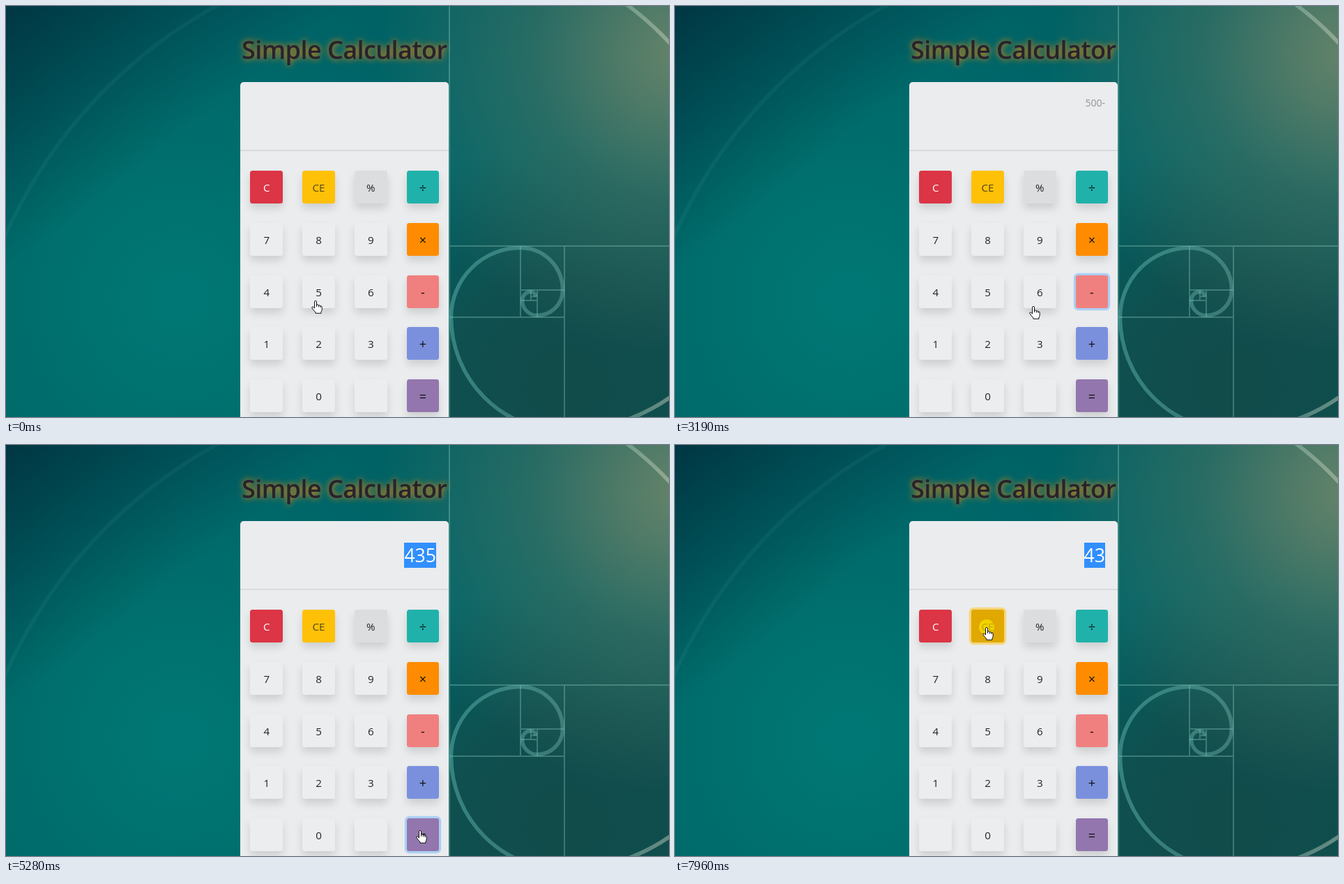
An HTML page for the animation above (8000 ms loop, 951x589 px).

```html
<!DOCTYPE html>
<html lang="en">
<head>
<meta charset="utf-8">
<title>Simple Calculator</title>
<style>
html, body { margin: 0; width: 100%; height: 100%; overflow: hidden; }
body {
  position: relative;
  font-family: "Open Sans", "Noto Sans", sans-serif;
  background:
    linear-gradient(142deg, #003743 0, #00374300 300px),
    radial-gradient(circle at 965px 70px, #64836a 0, #64836acc 80px, #64836a66 210px, #64836a00 430px),
    radial-gradient(ellipse 380px 340px at 800px 540px, #124b4a 0, #124b4ad0 45%, #124b4a00 100%),
    radial-gradient(circle at 250px 420px, #007875 0, #006e6c 220px, #006568 400px, #00585c 750px);
}
svg { position: absolute; left: 0; top: 0; width: 951px; height: 589px; fill: none; }
h1 {
  position: absolute; left: 338px; top: 38px; margin: 0;
  font-size: 36px; font-weight: 600; line-height: 49px; letter-spacing: -.55px;
  white-space: nowrap; color: #29222d; text-shadow: 0 0 10px #ff8c00;
}
#panel {
  position: absolute; left: 336px; top: 109px; width: 299px; height: 520px;
  border-radius: 5px; background: #eaecee;
}
#rule { position: absolute; left: 0; top: 97px; width: 100%; height: 2px; background: #d9dbde; }
#small, #main { position: absolute; right: 18px; line-height: normal; white-space: pre; }
#small { top: 20px; font-size: 14px; color: #909396; }
#main { top: 31px; font-size: 26.6px; color: #fff; background: #318ffe; }
.key {
  position: absolute; width: 46.7px; height: 47px; border-radius: 3.5px;
  font-size: 15.2px; line-height: 49px; text-align: center; color: #212529;
  background: #ebedef; box-shadow: 0 7px 12px #00000020;
}
.key.op { font-size: 18px; color: #111; }
.key.focus { box-shadow: 0 0 0 3.2px #abd0f4; }
.key.warn { color: #54481c; }
.key.warn.hover { background: #e0a800 !important; }
.key.warn.focus { box-shadow: 0 0 0 3.2px #f5d67b; }
</style>
</head>
<body>
<svg viewBox="0 0 951 589">
  <defs>
    <linearGradient id="fade" gradientUnits="userSpaceOnUse" x1="0" y1="0" x2="951" y2="0">
      <stop offset="0" stop-color="#62c4be" stop-opacity=".08"/>
      <stop offset=".33" stop-color="#62c4be" stop-opacity=".07"/>
      <stop offset=".67" stop-color="#70ccc5" stop-opacity=".4"/>
      <stop offset=".85" stop-color="#84c8c0" stop-opacity=".36"/>
      <stop offset="1" stop-color="#d2d8c4" stop-opacity=".45"/>
    </linearGradient>
  </defs>
  <path id="lines" stroke="#8cc8bd" stroke-opacity=".36" stroke-width="2"/>
  <path id="spiral" stroke="url(#fade)" stroke-width="5.5"/>
</svg>
<h1>Simple Calculator</h1>
<div id="panel">
  <div id="small"></div>
  <div id="main"></div>
  <div id="rule"></div>
</div>
<svg viewBox="0 0 951 589">
  <g id="pointer">
    <circle id="press" r="11" fill="#ffee00" fill-opacity=".6"/>
    <g stroke="#111" stroke-width="1" stroke-linejoin="round">
      <g id="hand">
        <path fill="#fff" d="M-1.5 1.8Q-1.5 .5 0 .5T1.5 1.8V6Q4 5.4 4.3 7Q6.6 6.2 7 8Q9.2 7.6 9.2 9.5V13Q9 15 8 16V18.3H0V17Q-3 14-5.2 10.5Q-5.5 8.6-3.6 9.2L-1.5 11Z"/>
        <path d="M1.5 6V9M4.3 7V9.5M7 8V10"/>
      </g>
      <path id="arrow" fill="#fff" d="M.5 .7V13.6L3.4 10.9L5.4 15.6L7.4 14.7L5.4 10.1H9.3Z"/>
    </g>
  </g>
</svg>
<script>
const LOOP = 8000, HOLD = 60;
const $ = id => document.getElementById(id);

// Golden spiral: each quarter turn shrinks by phi, its centre slides towards the arc's end.
function drawSpiral() {
  const PHI = (1 + Math.sqrt(5)) / 2, INSET = 2.5;
  const dirs = [[0, -1], [1, 0], [0, 1], [-1, 0]];
  let x = 636, y = 611, r = 699, arcs = '', lines = '';
  for (let turn = 3; r > 8; turn++) {
    const [ax, ay] = dirs[turn % 4], [bx, by] = dirs[(turn + 1) % 4];
    const q = r - INSET;
    arcs += `M${x + ax * q} ${y + ay * q}A${q} ${q} 0 0 1 ${x + bx * q} ${y + by * q}`;
    lines += `M${x} ${y}L${x + bx * r} ${y + by * r}`;
    const next = r / PHI;
    x += bx * (r - next);
    y += by * (r - next);
    r = next;
  }
  $('spiral').setAttribute('d', arcs);
  $('lines').setAttribute('d', lines);
}
drawSpiral();

const LABELS = ['C', 'CE', '%', '÷', '7', '8', '9', '×', '4', '5', '6', '-', '1', '2', '3', '+', '', '0', '', '='];
const COLORS = {
  C: '#dc3545', CE: '#ffc107', '%': '#dcddde', '÷': '#20b2aa',
  '×': '#ff8c00', '-': '#f08080', '+': '#7b90dd', '=': '#9376ae'
};
const keys = LABELS.map((label, i) => {
  const el = document.createElement('div');
  const x = 350.4 + i % 4 * 74.75, y = 236.3 + Math.floor(i / 4) * 74.7;
  el.className = 'key' + (label === 'CE' ? ' warn' : i % 4 === 3 ? ' op' : '');
  el.textContent = label;
  el.style.left = x + 'px';
  el.style.top = y + 'px';
  if (COLORS[label]) el.style.background = COLORS[label];
  if (label === 'C') el.style.color = '#fff';
  return { label, el, x, y };
});
$('panel').after(...keys.map(k => k.el));

const PRESSES = [
  { at: 80, key: '5' }, { at: 780, key: '0' }, { at: 935, key: '0' },
  { at: 2180, key: '-' }, { at: 3340, key: '6' }, { at: 4180, key: '5' },
  { at: 5190, key: '=' }, { at: 7260, key: 'CE' }, { at: 7955, key: 'CE' }
];

function calculate({ main, small }, key) {
  if (key === 'CE') return { main: main.slice(0, -1), small };
  if (key === '-') return { main: '', small: main + '-' };
  if (key === '=') return { main: String(parseFloat(small) - main), small: '' };
  return { main: main + key, small };
}

// Pointer moves: each one leaves at `from` and rests at (x, y) after `to`.
const START = { x: 444, y: 422 };
const MOVES = [
  { from: 240, to: 740, x: 443, y: 560 },
  { from: 1150, to: 1900, x: 602, y: 402 },
  { from: 2300, to: 2900, x: 510, y: 440 },
  { from: 3040, to: 3190, x: 514, y: 430 },
  { from: 3700, to: 4130, x: 450, y: 412 },
  { from: 4300, to: 4650, x: 598, y: 519 },
  { from: 4730, to: 4920, x: 594, y: 552 },
  { from: 5380, to: 5860, x: 466.5, y: 326 },
  { from: 6100, to: 6480, x: 447, y: 261 }
];
const ease = f => (1 - Math.cos(Math.PI * f)) / 2;

function pointerAt(t) {
  let { x, y } = START;
  for (const m of MOVES) {
    const f = ease(Math.min(1, Math.max(0, (t - m.from) / (m.to - m.from))));
    x += (m.x - x) * f;
    y += (m.y - y) * f;
  }
  return { x, y };
}

const show = (el, on) => { el.style.display = on ? '' : 'none'; };

function draw(t) {
  const { x, y } = pointerAt(t);
  const down = PRESSES.findLast(p => p.at <= t);
  const { main, small } = PRESSES
    .filter(p => p.at + HOLD <= t)
    .reduce((state, p) => calculate(state, p.key), { main: '', small: '' });
  let over = false;
  for (const k of keys) {
    const inside = x >= k.x && x <= k.x + 46.7 && y >= k.y && y <= k.y + 47;
    over = over || inside;
    k.el.classList.toggle('hover', inside);
    k.el.classList.toggle('focus', !!down && down.key === k.label);
  }
  $('main').textContent = main;
  $('small').textContent = small;
  $('pointer').setAttribute('transform', `translate(${x} ${y})`);
  show($('press'), down && t < down.at + HOLD);
  show($('hand'), over);
  show($('arrow'), !over);
}
function loop() {
  draw(performance.now() % LOOP);
  requestAnimationFrame(loop);
}
loop();
</script>
</body>
</html>
```
